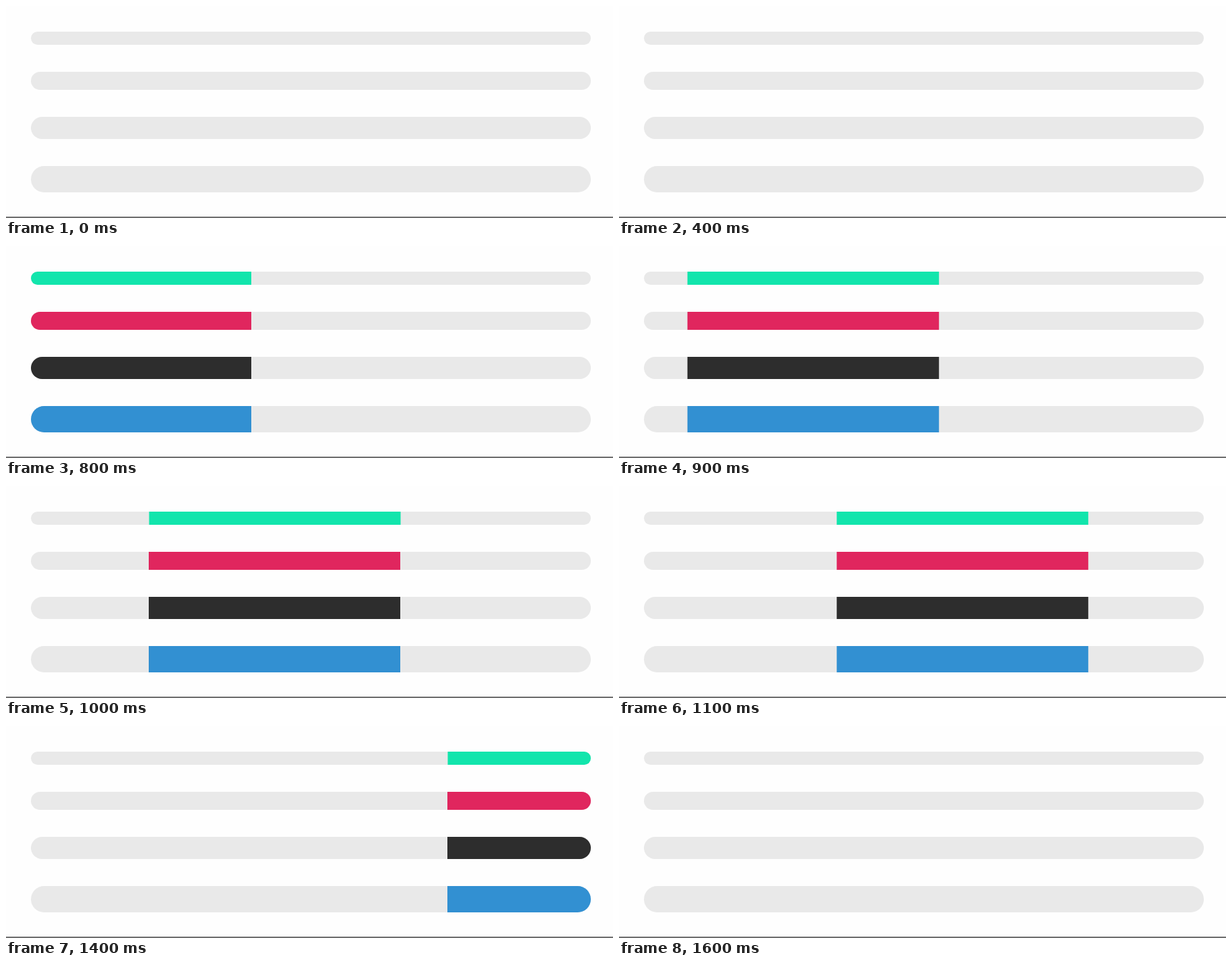
An HTML page for the animation above (1.7 s loop, 876 by 306 pixels).

```html
<!DOCTYPE html>
<html lang="en">
<head>
<meta charset="utf-8">
<title>Progress bars</title>
<style>
  html, body {
    margin: 0;
    width: 876px;
    height: 306px;
    overflow: hidden;
    background: #fefefe;
  }
  body { position: relative; }

  .bar {
    position: absolute;
    left: 35.5px;
    top: var(--y);
    width: 808.5px;
    height: var(--h);
    border-radius: 20px;
    overflow: hidden;
    background: #e9e9e9;
  }
  .bar::before {
    content: "";
    position: absolute;
    left: 0;
    top: 0;
    width: 45%;
    height: 100%;
    background: var(--c);
    animation: slide 1700ms steps(17) infinite;
  }
  /* Constant speed, redrawn every 100 ms; outside the track at both ends. */
  @keyframes slide {
    from { transform: translateX(-907px); }
    to   { transform: translateX(924.75px); }
  }

  .rule {
    position: absolute;
    left: 0;
    top: 304px;
    width: 100%;
    height: 1.5px;
    background: #707070;
  }
</style>
</head>
<body>
  <div class="bar" style="--y: 37px; --h: 19px; --c: #12e5ac"></div>
  <div class="bar" style="--y: 95px; --h: 26px; --c: #e0265e"></div>
  <div class="bar" style="--y: 159.5px; --h: 32px; --c: #2d2d2d"></div>
  <div class="bar" style="--y: 230.5px; --h: 38.5px; --c: #3290d2"></div>
  <div class="rule"></div>
</body>
</html>
```
